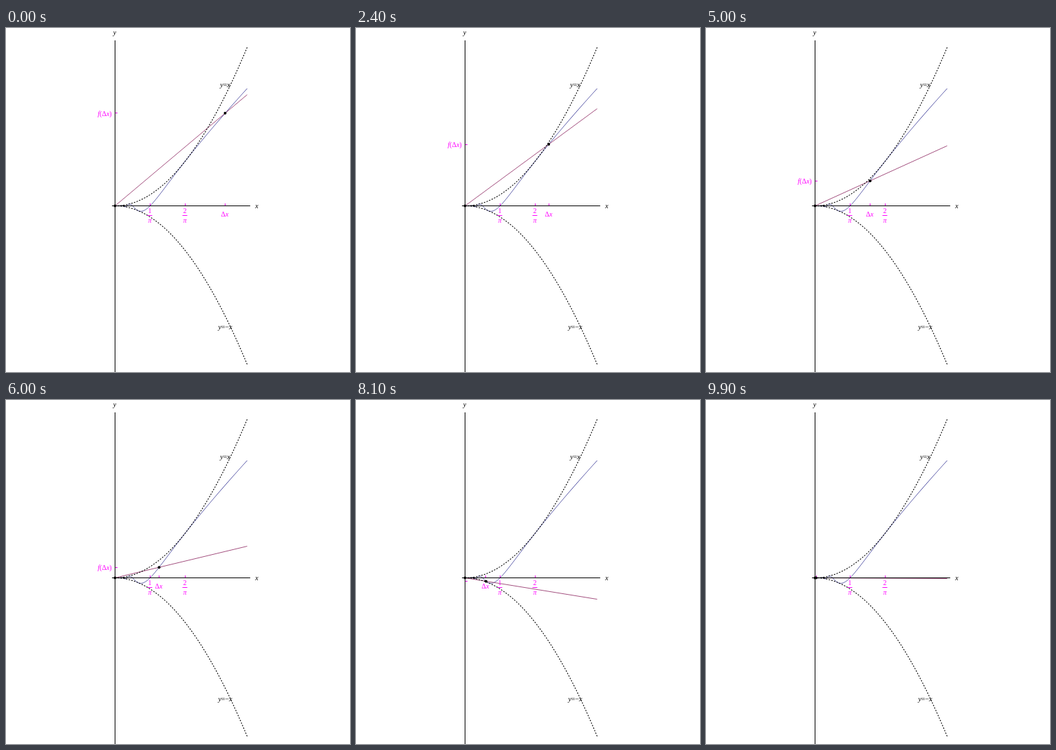
Animation of 500 by 500 pixels, one loop 10000 ms. Source, as an HTML page:

```html
<!DOCTYPE html>
<html lang="en">
<head>
<meta charset="utf-8">
<title>Secant through the origin</title>
<style>
  html, body { margin: 0; width: 100%; height: 100%; overflow: hidden; background: #fff; }
  svg { display: block; width: 500px; height: 500px; }
  text { font: 10px "Liberation Serif", "Times New Roman", serif; text-anchor: middle; }
  .i { font-style: italic; }
  path, line { fill: none; stroke: #000; stroke-width: 1; }
  .dashed { stroke-dasharray: 2 2; stroke-width: 1.1; }
  .curve { stroke: #3d3d99; stroke-width: .9; }
  .secant { stroke: #993d71; stroke-width: .9; }
  line.mark { stroke: #f0f; }
  text.mark { fill: #f0f; }
</style>
</head>
<body>
<svg id="stage" viewBox="0 0 500 500"></svg>
<script>
const STEP = 100, STEPS = 100;
const OX = 158.5, OY = 258.5, UNIT = 160, X_MAX = 1.2;
const LABEL_GAP = 0.0375; // labels this close to the axes crossing are hidden

const stage = document.getElementById('stage');
const px = x => OX + x * UNIT;
const py = y => OY - y * UNIT;
const f = x => x === 0 ? 0 : x * x * Math.sin(1 / x);

function add(tag, attrs, content = '') {
  const node = document.createElementNS('http://www.w3.org/2000/svg', tag);
  set(node, attrs);
  node.innerHTML = content;
  stage.appendChild(node);
  return node;
}

function set(node, attrs) {
  for (const name in attrs) node.setAttribute(name, attrs[name]);
}

function line(x1, y1, x2, y2, cls = '') {
  return add('line', { x1, y1, x2, y2, class: cls });
}

function label(x, y, content, cls = '') {
  return add('text', { x, y, class: cls }, content);
}

function plot(fn, cls) {
  const n = 400;
  let d = '';
  for (let i = 0; i <= n; i++) {
    const x = X_MAX * (i / n) ** 2;
    d += (i ? 'L' : 'M') + px(x).toFixed(2) + ' ' + py(fn(x)).toFixed(2);
  }
  return add('path', { d, class: cls });
}

function fraction(x, top) {
  const cx = Math.floor(px(x)) + 0.5;
  line(cx, 255, cx, 258, 'mark');
  label(cx - 0.5, 269, top, 'mark');
  line(cx - 4, 272.5, cx + 3, 272.5, 'mark');
  label(cx - 0.5, 283, 'π', 'mark i');
}

plot(f, 'curve');
const secant = line(OX, OY, 0, 0, 'secant');
plot(x => x * x, 'dashed');
plot(x => -x * x, 'dashed');

line(OX, 18, OX, 500);
line(154, OY, 355, OY);
fraction(1 / Math.PI, '1');
fraction(2 / Math.PI, '2');
const tickX = line(0, 255, 0, 258, 'mark');
const tickY = line(159, 0, 162, 0, 'mark');

label(158, 10, 'y', 'i');
label(364.5, 262, 'x', 'i');
label(318.5, 86, '<tspan class="i">y</tspan>=<tspan class="i">x</tspan>');
label(318.5, 438, '<tspan class="i">y</tspan>=−<tspan class="i">x</tspan>');

const delta = 'Δ<tspan class="i">x</tspan>';
const labelX = label(0, 274, delta, 'mark');
const labelY = label(143.5, 0, `<tspan class="i">f</tspan>(${delta})`, 'mark');

add('circle', { cx: OX, cy: OY, r: 2 });
const dot = add('circle', { r: 2 });

function render(time) {
  const step = Math.floor(time / STEP) % STEPS;
  const dx = 1 - step / STEPS;
  const dy = f(dx);
  const x = px(dx), y = py(dy);
  const snapX = Math.floor(x) + 0.5, snapY = Math.floor(y) + 0.5;

  set(secant, { x2: px(X_MAX), y2: py(X_MAX * dy / dx) });
  set(dot, { cx: x, cy: y });
  set(tickX, { x1: snapX, x2: snapX });
  set(tickY, { y1: snapY, y2: snapY });
  set(labelX, { x: snapX - 0.5, visibility: dx > LABEL_GAP ? 'visible' : 'hidden' });
  set(labelY, { y: Math.round(y + 4), visibility: Math.abs(dy) > LABEL_GAP ? 'visible' : 'hidden' });
}

const start = performance.now();
function tick() {
  render(performance.now() - start);
  requestAnimationFrame(tick);
}
tick();
</script>
</body>
</html>
```
